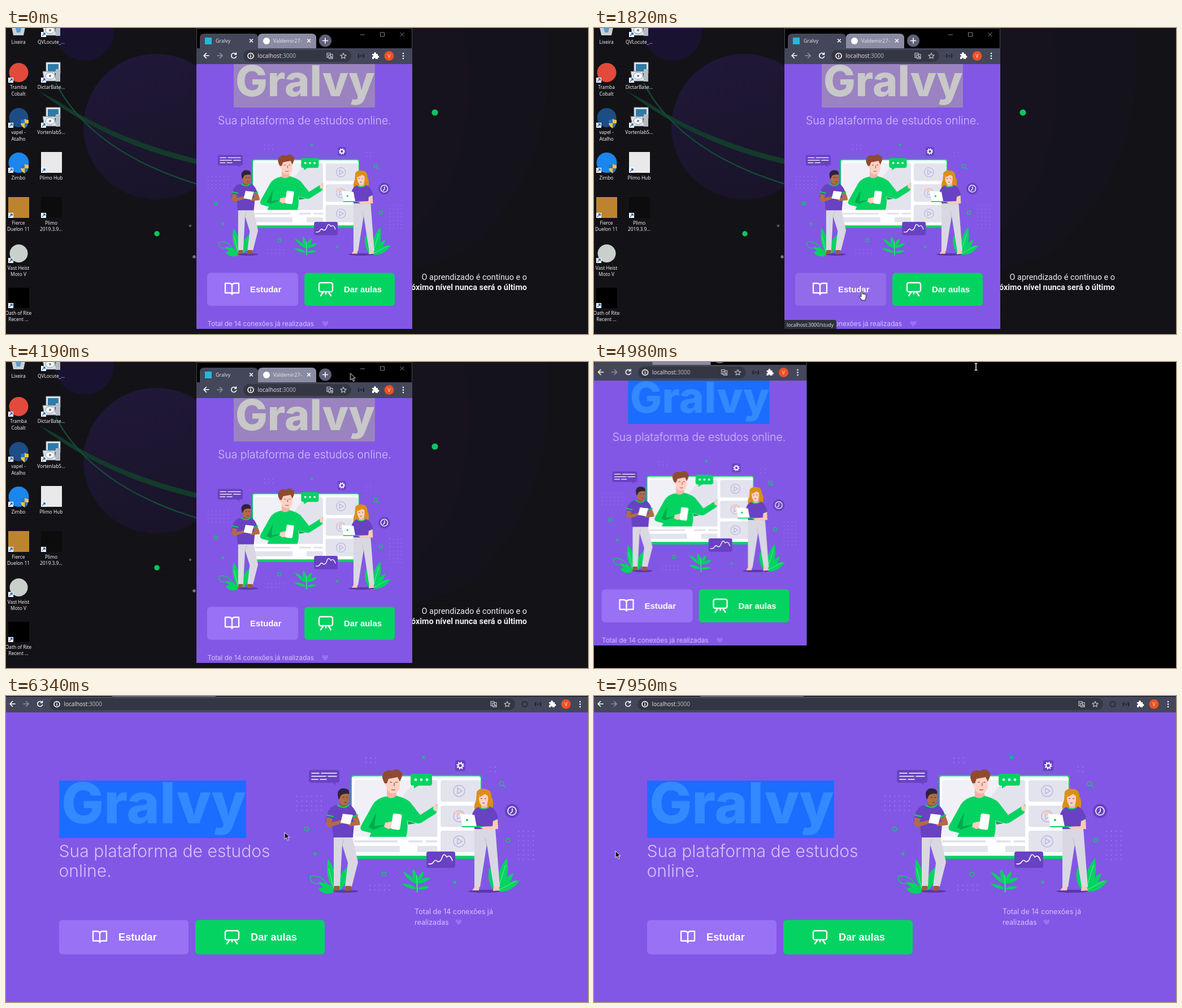
Animation, 1030 px wide and 543 px high, one loop 8000 ms. Source, as an HTML page:

```html
<!DOCTYPE html>
<html lang="pt">
<head>
<meta charset="utf-8">
<title>Gralvy</title>
<style>
html, body { margin: 0; width: 100%; height: 100%; overflow: hidden; background: #000; }
svg { display: block; width: 100%; height: 100%; }
text { white-space: pre; }
.ui { font: 10px "Open Sans", "Noto Sans", sans-serif; fill: #e8e8ee; }
.label { font-size: 8.4px; fill: #fff; text-anchor: middle; }
.tab { font-size: 9px; }
.status { font-size: 8.6px; }
.page { font-family: Inter, "Open Sans", sans-serif; fill: #d4c2ff; }
.title { font-weight: 300; }
.btn { font: bold 14.9px "Liberation Sans", Arial, sans-serif; fill: #fff; }
.big { font-size: 18.2px; }
.brand { font: 800 100px Inter, "Open Sans", sans-serif; fill: currentColor; }
.wall { font: 14.4px Roboto, sans-serif; fill: #eee; text-anchor: end; }
.strong { font-weight: 700; }
.line { fill: none; stroke: #fff; stroke-width: 1.6; stroke-linecap: round; stroke-linejoin: round; }
.icon { fill: none; stroke: #fff; stroke-width: 2.3; stroke-linejoin: round; stroke-linecap: round; }

/* One timeline of 8 s; 1% is 80 ms. */
.step { animation: 8s step-end infinite; }
#desktop { animation-name: desktop; }
#window { animation-name: maximize; }
#wide { animation-name: wide; }
#shortBar { animation-name: barShort; }
#longBar { animation-name: barLong; }
#narrowBrand { animation-name: selection; }
#study { animation-name: study; }
#teach { animation-name: teach; }
#teachWide { animation-name: teachWide; }
#studyUrl { animation-name: studyUrl; }
#teachUrl { animation-name: teachUrl; }
#closeHover { animation-name: closeHover; }
#maxHover { animation-name: maxHover; }
#arrow { animation-name: arrow; }
#hand { animation-name: hand; }
#beam { animation-name: beam; }
#cursor { animation: path 8s linear infinite; }

@keyframes desktop { 0% { opacity: 1 } 61.75%, 100% { opacity: 0 } }
@keyframes maximize {
  0% { transform: none; opacity: 1 }
  61.75% { transform: translate(-342.5px, -31px); opacity: 1 }
  62.8%, 100% { transform: none; opacity: 0 }
}
@keyframes wide { 0% { opacity: 0 } 62.8%, 100% { opacity: 1 } }
@keyframes barLong { 0% { opacity: 1 } 63.75%, 100% { opacity: 0 } }
@keyframes barShort { 0% { opacity: 0 } 63.75%, 100% { opacity: 1 } }
@keyframes selection { 0% { fill: #9a83c0; color: #c8c8c8 } 61.75%, 100% { fill: #1a6dff; color: #3389ff } }
@keyframes study { 0%, 18.3%, 30%, 39.5%, 100% { fill: #9871f5 } 14.25%, 21.6%, 32.1% { fill: #916bea } }
@keyframes teach { 0%, 21.2%, 100% { fill: #04d361 } 18.4% { fill: #04bf58 } }
@keyframes teachWide { 0%, 76.9%, 100% { fill: #04d361 } 74.6% { fill: #04bf58 } }
@keyframes studyUrl { 0%, 18.4%, 30%, 39.8%, 100% { opacity: 0 } 14.6%, 21.8%, 32.4% { opacity: 1 } }
@keyframes teachUrl { 0%, 21.5%, 100% { opacity: 0 } 18.6% { opacity: 1 } }
@keyframes closeHover { 0%, 57.5%, 100% { opacity: 0 } 54.6% { opacity: 1 } }
@keyframes maxHover { 0%, 61.75%, 100% { opacity: 0 } 57.5% { opacity: 1 } }
@keyframes arrow { 0%, 25.5%, 39.5%, 64.3%, 76.9%, 100% { opacity: 1 } 14.25%, 32.1%, 61.75%, 74.6% { opacity: 0 } }
@keyframes hand { 0%, 25.5%, 39.5%, 76.9%, 100% { opacity: 0 } 14.25%, 32.1%, 74.6% { opacity: 1 } }
@keyframes beam { 0%, 64.3%, 100% { opacity: 0 } 61.75% { opacity: 1 } }
@keyframes path {
  0%, 3.7% { transform: translate(950px, 560px) }
  3.75% { transform: translate(950px, 532px) }
  7.5% { transform: translate(700px, 310px) }
  10% { transform: translate(470px, 281px) }
  11.875% { transform: translate(366px, 330px) }
  13.875% { transform: translate(380px, 415px) }
  17.5% { transform: translate(460px, 460px) }
  18.5% { transform: translate(540px, 460px) }
  20% { transform: translate(600px, 465px) }
  21.75% { transform: translate(510px, 470px) }
  22.75% { transform: translate(474px, 467px) }
  23.75% { transform: translate(481px, 474px) }
  27.375%, 30% { transform: translate(497px, 517px) }
  33.125% { transform: translate(450px, 480px) }
  36.25% { transform: translate(470px, 455px) }
  39.875% { transform: translate(505px, 432px) }
  43.75% { transform: translate(445px, 250px) }
  47.5% { transform: translate(500px, 90px) }
  50% { transform: translate(533px, 5px) }
  51.375% { transform: translate(560px, 24px) }
  52.375% { transform: translate(609px, 20px) }
  55% { transform: translate(703px, 10px) }
  57.5% { transform: translate(686px, 14px) }
  59.375%, 63.75% { transform: translate(676px, 8px) }
  71.75% { transform: translate(742px, 335px) }
  75% { transform: translate(540px, 440px) }
  76.5% { transform: translate(470px, 425px) }
  79.25% { transform: translate(493px, 242px) }
  81.25%, 82.5% { transform: translate(508px, 225px) }
  85.625% { transform: translate(400px, 125px) }
  88.125% { transform: translate(310px, 108px) }
  90% { transform: translate(132px, 170px) }
  92.125%, 93% { transform: translate(250px, 205px) }
  94.375% { transform: translate(274px, 195px) }
  96.25% { transform: translate(155px, 250px) }
  99.375%, 100% { transform: translate(38px, 275px) }
}
</style>
</head>
<body>
<svg viewBox="0 0 1030 543" preserveAspectRatio="none">
<defs>
  <linearGradient id="planet" x1="0" y1="0" x2=".3" y2="1">
    <stop offset="0" stop-color="#21183a"/><stop offset="1" stop-color="#19142a"/>
  </linearGradient>
  <pattern id="scan" width="8" height="4" patternUnits="userSpaceOnUse"><path d="M0 1h8" stroke="#151519"/></pattern>

  <g id="shortcut"><rect width="9" height="9" fill="#fff"/><path d="M2 7l5-5M3.500 2H7v3.500" fill="none" stroke="#1b62b5" stroke-width="1.500"/></g>
  <g id="shield"><path d="M0 1q5 0 7-2 2 2 7 2 0 11-7 15-7-4-7-15z" fill="#2c73cf"/><path d="M7-1q2 2 7 2v6H7zM0 7h7v9Q1 13 0 7z" fill="#f6c62f"/></g>
  <g id="installer">
    <rect x="9" y="0" width="25" height="19" fill="#e4eaf0" stroke="#8a97a5"/>
    <rect x="12" y="3" width="19" height="13" fill="#2f7aa8"/>
    <path d="M3 16h21l3 17H6z" fill="#dfe4e9" stroke="#78838f"/>
    <ellipse cx="16" cy="24" rx="8" ry="6" fill="#f5f7fa" stroke="#8a97a5"/><circle cx="16" cy="24" r="2" fill="#6e7d8c"/>
    <path d="M26 12h8v22h-8z" fill="#b4bcc5"/>
    <use href="#shortcut" y="27"/>
  </g>

  <g id="book" class="icon"><path d="M-12-10h7q5 0 5 5v15q0-3-4-3h-8zM12-10H5q-5 0-5 5v15q0-3 4-3h8z"/></g>
  <g id="board" class="icon"><rect x="-12" y="-11" width="24" height="16" rx="3"/><path d="M-5 6l-4 6M5 6l4 6M0 6v3"/></g>
  <path id="heart" d="M0 5l-5-5q-1.500-4.500 2-5 2 0 3 2 1-2 3-2 3.500.500 2 5z" fill="#9871f5"/>
  <g id="brand"><rect width="331" height="102"/><text class="brand" x="4" y="76">Gralvy</text></g>

  <g id="nav">
    <path class="line" d="M16 14H7m4.500-4.500L7 14l4.500 4.500"/>
    <path class="line" opacity=".4" d="M31 14h9m-4.500-4.500L40 14l-4.500 4.500"/>
    <path class="line" d="M64 11.500a4.500 4.500 0 1 0 .5 4M64.500 9v3h-3"/>
    <circle class="line" cx="90" cy="14.500" r="5"/><path class="line" d="M90 14v3M90 11.800v.1"/>
    <text class="ui" x="102.500" y="18">localhost<tspan fill="#b9bac6">:3000</tspan></text>
  </g>
  <g id="pageTools" class="line" style="stroke:#c4c5d0;stroke-width:1.200">
    <path d="M880 9.500h6l1 8h-7zM887 11.500h3v8h-6l-1-2M881.500 12.500h4M884 14l-2 2M886 14.500l3 3"/>
    <path d="M909 9.500l1.500 3.300 3.500.4-2.600 2.400.7 3.500-3.100-1.800-3.100 1.800.7-3.500-2.600-2.400 3.500-.4z"/>
  </g>
  <g id="tools">
    <path d="M938 11q-3 3.500 0 7M945 11q3 3.500 0 7M939.500 14.500h4" fill="none" stroke="#1f2029" stroke-width="1.800"/>
    <path d="M961 11h3q0-3 2-3t2 3h3v3q2.500 0 2.500 2t-2.500 2v2h-4q0-2-1.500-2t-1.500 2h-3v-4q2 0 2-1.500t-2-1.500z" fill="#fff"/>
    <circle cx="991" cy="14.500" r="8.500" fill="#ee5124"/><text class="ui tab" x="991" y="18" text-anchor="middle">V</text>
    <path class="line" d="M1016 10v.1M1016 14.500v.1M1016 19v.1" style="stroke-width:2.600"/>
  </g>

  <path id="leaf" d="M0 0q-14-18 0-40 14 22 0 40z"/>
  <g id="play"><rect x="-33" y="-19" width="71" height="38" rx="4" fill="#e3e3ee"/><g fill="none" stroke="#bdb6dc" stroke-width="1.500"><circle r="10"/><path d="M-3-5l8 5-8 5z"/></g></g>

  <g id="art">
    <path d="M637 110h19M637 118h19M857 126h17M857 134h17M515 178h44M515 186.500h44M515 195h44M515 203h44M907 240h28M907 248.400h28M907 256.800h28M907 265.200h28M907 273.600h28M907 282h28M907 290h28M644 336h35M644 344h35" fill="none" stroke="#a484f0" stroke-width="1.800" stroke-linecap="round" stroke-dasharray="0 8.600"/>
    <g fill="none" stroke="#04d361" stroke-width="1.500">
      <circle cx="532" cy="236" r="3.600"/><circle cx="669" cy="316" r="3.600"/><circle cx="888" cy="256" r="3.600"/><circle cx="877" cy="155.500" r="3.800"/>
      <path d="M880 158.500l4 3.500M736.500 106.500l5 5m0-5l-5 5M791.500 328l5 5m0-5l-5 5M543.500 280h7M547 276.500v7"/>
    </g>
    <g fill="#04d361">
      <use href="#leaf" transform="translate(582 346) rotate(-12) scale(1 1.450)"/>
      <use href="#leaf" transform="translate(584 347) rotate(-62) scale(.7 .9)"/>
      <use href="#leaf" transform="translate(588 347) rotate(20) scale(1 1.150)"/>
      <use href="#leaf" transform="translate(580 348) rotate(-78) scale(.8 .7)"/>
      <use href="#leaf" transform="translate(872 346) rotate(14) scale(1.100 1.500)"/>
      <use href="#leaf" transform="translate(866 347) rotate(-14) scale(.9 1.100)"/>
      <use href="#leaf" transform="translate(872 347) rotate(62) scale(.9 1.050)"/>
      <use href="#leaf" transform="translate(870 348) rotate(40) scale(.8 1.100)"/>
      <use href="#leaf" transform="translate(727 334) rotate(-48) scale(.45 .85)"/>
      <use href="#leaf" transform="translate(727 334) rotate(-14) scale(.55 .7)"/>
      <use href="#leaf" transform="translate(727 332) rotate(30) scale(.5 .6)"/>
      <use href="#leaf" transform="translate(728 332) rotate(68) scale(.5 .62)"/>
      <use href="#leaf" transform="translate(727 342) rotate(-72) scale(.45 .68)"/>
      <use href="#leaf" transform="translate(728 342) rotate(82) scale(.4 .55)"/>
      <path d="M726 326h2.500v23h-2z"/>
    </g>
    <path d="M575 343q-16-28-36-23-2 13 12 13 14 1 24 10" fill="none" stroke="#04d361" stroke-width="1.500"/>
    <path d="M580 342l-9-36M871 342l13-42M873 344l30-16M728 348l-1-30" fill="none" stroke="#fff" opacity=".45"/>

    <rect x="610" y="140" width="232" height="149" rx="5" fill="#04d361"/>
    <rect x="612" y="142.500" width="228" height="141" rx="4" fill="#fff"/>
    <rect x="616" y="149" width="147.500" height="101" rx="4" fill="#f0f0f6"/>
    <path d="M763 157v93h-116l78-101h34q4 0 4 4z" fill="#e3e3ee"/>
    <use href="#play" x="802" y="168.500"/><use href="#play" x="802" y="213.500"/><use href="#play" x="802" y="258"/>
    <path d="M616 256h77v4h-77zM712 256h25v4h-25zM743 256h20v4h-20zM616 266h81v11h-81zM728 266h35v11h-35z" fill="#e3e3ee"/>

    <path d="M674 162h17v19q-8 10-17 0z" fill="#f3b4a8"/>
    <path d="M673 178q-17 3-24 15l-20 36q-5 9 5 11l12 3-3 7h65q4-12 2-29l18 5q5 1 10-3l22-14q5-5 3-17l-30 19-18-23q-8-7-24-11-9 8-18 1z" fill="#04d361"/>
    <path d="M655 207l-3 24 22-3-24 9-8-4zM708 208l3 14 14 4-13 2z" fill="#03a84d"/>
    <path d="M672 146q13-7 25 0v15q-2 12-12 12t-12-13q-5-3-1-7z" fill="#ffd0c4"/>
    <path d="M670 155q-7-12-2-18 6-8 16-4 6-6 12-1 8 4 4 13l-3 7-4-8-16 3-3 8z" fill="#8e4b32"/>
    <path d="M679 153h4M689 153h4M687 154v6M682 166q4 2 7 0" fill="none" stroke="#6b3a30"/>
    <path d="M671 225l14-3 8 3-3 8-14 3-7-4z" fill="#ffd0c4"/>
    <rect x="683" y="209" width="16" height="28" rx="3" fill="#fff" transform="rotate(8 691 223)"/>
    <path d="M757 203q-3-8 4-12 4 7 2 14z" fill="#ffd0c4"/>
    <path d="M720 138h30q4 0 4 4v13q0 4-4 4h-20l-8 5v-5h-2q-4 0-4-4v-13q0-4 4-4z" fill="#04d361"/>
    <g fill="#fff"><circle cx="725" cy="148.500" r="2.300"/><circle cx="735" cy="148.500" r="2.300"/><circle cx="745" cy="148.500" r="2.300"/></g>

    <g fill="#5838a8"><ellipse cx="601" cy="346.500" rx="22" ry="2.600"/><ellipse cx="846" cy="346.500" rx="28" ry="2.600"/></g>
    <path d="M580 249h33l10 46-11 43h-12l5-42-10-32-4 74h-11z" fill="#d9d8e2"/>
    <path d="M595 264l3-10" stroke="#b8b6c8"/>
    <path d="M581 337h9v6l-11 4zM601 337h9l2 8-12 1z" fill="#9c5c3d"/>
    <path d="M591 186h14v10q-6 5-14 0z" fill="#96583a"/>
    <path d="M586 193q-14 3-17 15l-4 15 12 4 2 24h35l2-23 8-2q-2-23-15-33-12 7-23 0z" fill="#6842c2"/>
    <path d="M567 211l13 3M612 215l11-4M586 193q12 9 21 0" fill="none" stroke="#04d361" stroke-width="2.500"/>
    <path d="M568 215l10 3-2 6 18-4v6l-22 7q-8-3-4-18zM613 217l9-4q6 13 4 16l-19 2-3-6 12-2z" fill="#b06c47"/>
    <path d="M596 209l18 2-5 17-17-3z" fill="#fff"/>
    <path d="M589 173q9-6 18 0v13q-2 9-9 8-7 0-9-10z" fill="#b06c47"/>
    <path d="M589 184q-6-17 6-20 14-1 12 10-9-2-14 2z" fill="#2d2338"/>
    <path d="M596 180h3M602 180h3M599 189h4" stroke="#49261c"/>

    <path d="M829 235h37l8 104h-11l-12-76-12 76h-10z" fill="#d9d8e2"/>
    <path d="M848 252l3 15" stroke="#b8b6c8"/>
    <path d="M830 338h8l-1 7h-12zM863 338h9l2 7-12 1z" fill="#ffcab8"/>
    <path d="M833 170q5-7 15-5 11 1 11 13 6 11 1 24-10 8-17 0-6 4-13 1-3-9 2-18z" fill="#da8f16"/>
    <path d="M841 187h11v12h-11z" fill="#f3b4a8"/>
    <path d="M836 197q10 7 20-1 11 4 15 21l-6 4 1 15h-37v-18l-5-4q3-14 12-17z" fill="#6842c2"/>
    <path d="M837 197q8 7 18 0M862 223l8-4M824 213l6 4" fill="none" stroke="#04d361" stroke-width="2"/>
    <path d="M837 176q10-7 16 1v8q-1 11-8 11-6-1-8-12z" fill="#ffd0c4"/>
    <path d="M837 180q1-10 8-13 8 2 11 13l-8-6z" fill="#da8f16"/>
    <path d="M840 182h3M847 182h3M843 190h4" stroke="#6b3a30"/>
    <path d="M862 222l8-3 1 17-25 1-9-5 24-1zM824 214l4 5-11 7-12-13-15-10 16 3 11 11z" fill="#ffcab8"/>
    <path d="M803 209l26 2 4 21-25-1z" fill="#fff"/><path d="M807 232h36" stroke="#04d361" stroke-width="2"/><circle cx="816" cy="220" r="2" fill="#04d361"/>

    <g fill="#6842c2">
      <path d="M540 131h46q4 0 4 4v15q0 4-4 4h-3v4l-5-4h-38q-4 0-4-4v-15q0-4 4-4z"/>
      <rect x="795" y="114" width="18" height="19" rx="3"/><circle cx="895.500" cy="204" r="12.700"/>
      <rect x="744" y="276" width="51" height="29" rx="4"/>
    </g>
    <g class="line">
      <path d="M541 137h13M558 137h27M541 142.500h25M570 142.500h15M541 148h11M556 148h11"/>
      <circle cx="895.500" cy="204" r="7.500"/><path d="M896 200v5l-3 3"/>
      <path d="M748 298q6 1 9-4t7 0q5 1 8-8t8 0q6-6 10 6"/>
      <circle cx="804" cy="123.500" r="3.800" style="stroke-width:2.200"/><circle cx="804" cy="123.500" r="5.700" stroke-dasharray="2 2.470" style="stroke-width:2.200;stroke-linecap:butt"/>
    </g>
  </g>
</defs>

<rect width="1030" height="543"/>

<g id="desktop" class="step">
  <rect width="1030" height="543" fill="#121116"/>
  <rect width="1030" height="543" fill="url(#scan)"/>
  <path d="M719 0h240q20 260-150 400l-90 30z" fill="#14121a"/>
  <path d="M719 0h90q30 150-30 290l-60 70z" fill="#16131f"/>
  <circle cx="139" cy="6" r="52" fill="#191230"/>
  <circle cx="266" cy="175" r="129" fill="url(#planet)"/>
  <path d="M58 112q120 94 282 130v-9Q190 196 92 130z" fill="#133a2b"/>
  <path d="M88 98q66 124 254 180" fill="none" stroke="#144a34" stroke-width="2.500"/>
  <circle cx="267" cy="365" r="4.700" fill="#0bc660"/><circle cx="759" cy="150" r="5.600" fill="#0bc660"/>
  <circle cx="333" cy="406" r="2.700" fill="#777"/><path d="M323.500 351h5M326 348.500v5" stroke="#888"/>
  <rect y="538" width="1030" height="5" fill="#15131a"/>
  <text class="wall" x="922" y="447">O aprendizado é contínuo e o</text>
  <text class="wall strong" x="922" y="465">próximo nível nunca será o último</text>

  <path d="M9-6h26l-4 19H13z" fill="#c9d0d6"/><path d="M17 0h10l-2 8h-6z" fill="#5c9bd1"/>
  <use href="#installer" x="62" y="-20"/><use href="#installer" x="62" y="61"/><use href="#installer" x="62" y="141"/>
  <circle cx="22.500" cy="79" r="17" fill="#e24a3b"/>
  <circle cx="22.500" cy="159" r="17" fill="#1c4d84"/>
  <circle cx="22.500" cy="239" r="18" fill="#1a86ee"/>
  <rect x="62" y="220" width="37" height="37" fill="#e9e9e9"/>
  <rect x="4" y="300" width="37" height="37" fill="#bd8430"/>
  <rect x="62" y="300" width="37" height="37" fill="#0c0c0c"/>
  <circle cx="22.500" cy="400" r="16" fill="#c9cfca"/>
  <rect x="4" y="461" width="37" height="36" fill="#000"/>
  <use href="#shield" x="26" y="162"/><use href="#shield" x="26" y="242"/>
  <use href="#shortcut" x="4" y="88"/><use href="#shortcut" x="4" y="168"/><use href="#shortcut" x="4" y="248"/><use href="#shortcut" x="4" y="328"/><use href="#shortcut" x="4" y="408"/><use href="#shortcut" x="4" y="488"/><use href="#shortcut" x="62" y="248"/><use href="#shortcut" x="62" y="328"/>
  <g class="ui label">
    <text x="22" y="28">Lixeira</text><text x="80" y="28">QVLocute_...</text>
    <text x="22" y="108">Tramba<tspan x="22" dy="12">Cobalt</tspan></text><text x="80" y="108">DictarBase...</text>
    <text x="22" y="188">vapel -<tspan x="22" dy="12">Atalho</tspan></text><text x="80" y="188">VortenlabS...</text>
    <text x="22" y="269">Zimbo</text><text x="80" y="269">Plimo Hub</text>
    <text x="22" y="349">Fierce<tspan x="22" dy="11">Duelon 11</tspan></text><text x="80" y="349">Plimo<tspan x="80" dy="11">2019.3.9...</tspan></text>
    <text x="22" y="429">Vast Heist<tspan x="22" dy="11">Moto V</tspan></text>
    <text x="22" y="509">Oath of Rite<tspan x="22" dy="11">Recent ...</tspan></text>
  </g>
</g>

<g id="window" class="step">
  <rect x="337" width="382" height="534"/>
  <path d="M337.500 36V.5h381V36" fill="none" stroke="#4b4b55"/>
  <rect id="closeHover" class="step" x="684" y="1" width="35" height="22" fill="#e81123"/>
  <rect id="maxHover" class="step" x="648" y="1" width="36" height="22" fill="#2a2a2e"/>
  <path d="M627 12h8M662.500 8h7v7h-7zM697.500 8l7 7m0-7l-7 7" fill="none" stroke="#85858c"/>
  <path d="M446 36V18q0-8 8-8h87q8 0 8 8v18z" fill="#8b8ca3"/>
  <path d="M343 36V18q0-8 8-8h87q8 0 8 8v18z" fill="#44475a"/>
  <rect x="352" y="17" width="12" height="12" fill="#28b6d8"/><circle cx="461" cy="23" r="6" fill="#fff"/>
  <text class="ui tab" x="371" y="26">Gralvy</text><text class="ui tab" x="473" y="26">Valdemir27-</text>
  <path class="line" d="M431.500 20l5 5m0-5l-5 5M533.500 20l5 5m0-5l-5 5"/>
  <circle cx="565" cy="22.500" r="11" fill="#5f6178"/><path class="line" d="M560.500 22.500h9M565 18v9"/>
  <rect x="337" y="36" width="382" height="28" fill="#44475a"/>
  <rect x="420" y="39" width="191" height="21" rx="10.500" fill="#343643"/>
  <use href="#nav" x="343" y="35"/><use href="#pageTools" x="-312" y="35"/><use href="#tools" x="-313" y="35"/>
  <rect x="337" y="64" width="382" height="470" fill="#8257e5"/>
  <g id="narrowBrand" class="step"><use href="#brand" transform="translate(403 64) scale(.755)"/></g>
  <text class="page title" x="375" y="171" font-size="19.400">Sua plataforma de estudos online.</text>
  <use href="#art" transform="matrix(.8197 0 0 .8197 -64.600 117.800)"/>
  <rect id="study" class="step" x="356" y="434.500" width="161" height="58.500" rx="6"/>
  <rect id="teach" class="step" x="528" y="434.500" width="160" height="58.500" rx="6"/>
  <use href="#book" x="400" y="463"/><use href="#board" x="566" y="463"/>
  <text class="btn" x="432" y="468.500">Estudar</text><text class="btn" x="598" y="468.500">Dar aulas</text>
  <text class="page" x="356.500" y="529" font-size="11.700">Total de 14 conexões já realizadas</text>
  <use href="#heart" x="565" y="525"/>
  <g id="studyUrl" class="step"><path d="M337 518h88q4 0 4 4v12h-92z" fill="#2e303d"/><text class="ui status" x="341" y="529.500">localhost:3000/study</text></g>
  <g id="teachUrl" class="step"><path d="M337 518h114q4 0 4 4v12H337z" fill="#2e303d"/><text class="ui status" x="341" y="529.500">localhost:3000/give-classes</text></g>
</g>

<g id="wide" class="step">
  <rect width="1030" height="543" fill="#8257e5"/>
  <rect width="1030" height="29" fill="#44475a"/><path d="M0 .5h188M371 .5h659" stroke="#08080c"/><path d="M188 .5h183" stroke="#77798f"/>
  <g id="longBar" class="step"><rect x="77" y="4" width="846" height="21" rx="10.500" fill="#343643"/><use href="#pageTools"/></g>
  <g id="shortBar" class="step"><rect x="77" y="4" width="824" height="21" rx="10.500" fill="#343643"/><use href="#pageTools" x="-22"/><circle cx="918" cy="14.500" r="4.500" fill="none" stroke="#2b2c38" stroke-width="2"/></g>
  <use href="#nav"/><use href="#tools"/>
  <g fill="#1a6dff" color="#3389ff"><use href="#brand" x="94" y="150"/></g>
  <text class="page title" x="93.500" y="286" font-size="30.100">Sua plataforma de estudos<tspan x="93.500" dy="35">online.</tspan></text>
  <use href="#art"/>
  <rect x="94" y="397.500" width="229" height="61" rx="6" fill="#9871f5"/>
  <rect id="teachWide" class="step" x="335" y="397.500" width="229" height="61" rx="6"/>
  <use href="#book" x="166" y="427.500"/><use href="#board" x="400" y="427.500"/>
  <text class="btn big" x="199" y="434">Estudar</text><text class="btn big" x="433" y="434">Dar aulas</text>
  <text class="page" x="723" y="387" font-size="12.600">Total de 14 conexões já<tspan x="723" dy="19">realizadas</tspan></text>
  <use href="#heart" x="801" y="401.500"/>
</g>

<g id="cursor" stroke-linejoin="round">
  <path id="arrow" class="step" d="M0 0v12l3-2.600 2.200 5 2-1-2.200-4.700h4z" fill="#0a0a0a" stroke="#fff" stroke-width=".9"/>
  <path id="hand" class="step" d="M-1.200 8V.500q1.200-1.500 2.400 0V5q1.500-.8 2.300.3 1.500-.8 2.300.4 1.700-.4 1.700 1.300 0 6-2 9H-.500q-1-3-4-6 .5-2.500 3.300 0z" fill="#fff" stroke="#111"/>
  <path id="beam" class="step" d="M-2.500-5.500h2L0-5l.5-.500h2M0-5V6M-2.500 6.500h2L0 6l.5.500h2" fill="none" stroke="#eee" stroke-width="1.500"/>
</g>
</svg>
</body>
</html>
```
